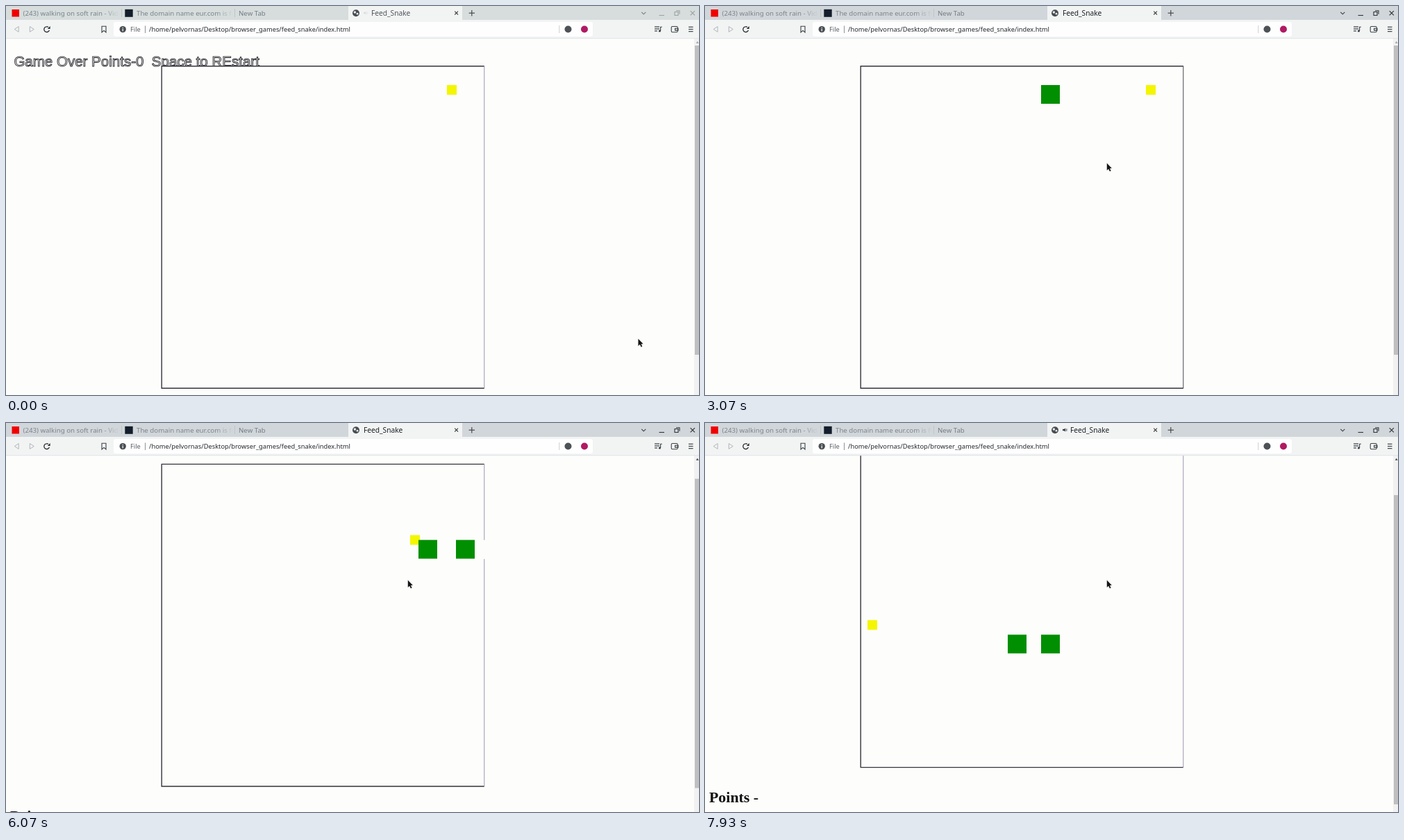
Recreate the animation shown at these times as an HTML page with a canvas. Size 998 by 561 pixels, loop 8 s.

```html
<!DOCTYPE html>
<html lang="en">
<head>
<meta charset="utf-8">
<title>Feed_Snake</title>
<style>
html, body { margin: 0; width: 100%; height: 100%; overflow: hidden; background: #fdfdfb; }
canvas { display: block; width: 998px; height: 561px; }
</style>
</head>
<body>
<canvas id="stage" width="998" height="561"></canvas>
<script>
const g = document.getElementById('stage').getContext('2d');
const LOOP = 8000, TICK = 100, UNIT = 0.684, PAPER = '#fdfdfb';
const BOARD = { x: 224.2, y: 86.7, size: 464.6 };
const UI = '"Noto Sans", "Open Sans", sans-serif';
const INK = '#3b4044';

const RESTART = 2830, MEALS = [4970, 6170];
const FOODS = [[600, 40], [523, 149], [15, 369]];
const SPEEDS = [0.1, 0.12, 0.35];   // board units per ms, by score
const DIRS = { right: [1, 0], left: [-1, 0], up: [0, -1], down: [0, 1] };
// The arrow keys steer the snake and scroll the page
const KEYS = [
  [2770, 'right'], [4870, 'down'], [5870, 'left'], [6400, 'up'],
  [6600, 'left'], [6780, 'down'], [7470, 'down'], [7667, 'left']
];

const clamp = (v, lo = 0, hi = 1) => Math.max(lo, Math.min(hi, v));
const ease = v => { v = clamp(v); return v * v * (3 - 2 * v); };
const mix = (a, b, p) => a + (b - a) * p;
const scoreAt = t => MEALS.filter(m => t >= m).length;

function rect(x, y, w, h, color) {
  g.fillStyle = color;
  g.fillRect(x, y, w, h);
}

function box(x, y, w, h, color, width = 1.1, r = 0) {
  g.strokeStyle = color;
  g.lineWidth = width;
  g.beginPath();
  g.roundRect(x, y, w, h, r);
  g.stroke();
}

function dot(x, y, r, color) {
  g.fillStyle = color;
  g.beginPath();
  g.arc(x, y, r, 0, Math.PI * 2);
  g.fill();
}

function trace(points, close) {
  g.beginPath();
  points.forEach(([x, y]) => g.lineTo(x, y));
  if (close) g.closePath();
}

function line(points, color, width = 1.1, close = false) {
  g.strokeStyle = color;
  g.lineWidth = width;
  trace(points, close);
  g.stroke();
}

function shape(points, color) {
  g.fillStyle = color;
  trace(points, true);
  g.fill();
}

// Corners of a triangle whose tip points along dx, dy
function triangle(x, y, dx, dy, r) {
  return [[x + dx * r, y + dy * r],
          [x - dx * r - dy * r * 1.3, y - dy * r - dx * r * 1.3],
          [x - dx * r + dy * r * 1.3, y - dy * r + dx * r * 1.3]];
}

function cross(x, y, r, turn, color) {
  for (const a of [turn, turn + Math.PI / 2]) {
    const dx = Math.cos(a) * r, dy = Math.sin(a) * r;
    line([[x - dx, y - dy], [x + dx, y + dy]], color, 1.15);
  }
}

function clipped(x, y, w, h, draw) {
  g.save();
  g.beginPath();
  g.rect(x, y, w, h);
  g.clip();
  draw();
  g.restore();
}

function label(text, x, y, size, color, weight = 400, family = UI) {
  g.font = `${weight} ${size}px ${family}`;
  g.fillStyle = color;
  g.fillText(text, x, y);
}

function fadedLabel(text, x, end) {
  const fade = g.createLinearGradient(end - 24, 0, end, 0);
  fade.addColorStop(0, '#7b838a');
  fade.addColorStop(1, 'rgba(123,131,138,0)');
  clipped(x, 0, end - x, 20, () => label(text, x, 13.5, 9.7, fade));
}

function scrollAt(t) {
  let pos = 0;
  for (const [time, key] of KEYS) {
    const goal = clamp(pos + DIRS[key][1] * 40, 0, 80);
    pos = mix(pos, goal, ease((t - time - TICK) / 150));
  }
  return pos * UNIT;
}

function snakeAt(t) {
  let x = 350, y = 40, dir = DIRS.right, k = 0;
  for (let time = KEYS[0][0]; time < t; time += 10) {
    while (k < KEYS.length && KEYS[k][0] <= time) dir = DIRS[KEYS[k++][1]];
    const step = SPEEDS[scoreAt(time)] * 10;
    x += dir[0] * step;
    y += dir[1] * step;
  }
  const snap = v => Math.round(v / 10) * 10;
  return { x: snap(x), y: snap(y), dir };
}

function block(x, y, size, color) {
  const side = Math.round(size * UNIT);
  rect(Math.round(BOARD.x + x * UNIT), Math.round(BOARD.y + y * UNIT), side, side, color);
}

function drawSnake(t) {
  const n = Math.floor((t - 70) / TICK), tick = n * TICK + 70;
  const flickers = n % 16 < 11;
  if (t < RESTART || (flickers && t - tick < 30)) return;
  const { x, y, dir: [dx, dy] } = snakeAt(tick);
  const score = scoreAt(t), gap = 90 - score * 10;
  const tail = { x: x - dx * gap, y: y - dy * gap };
  block(x, y, 40, '#008f00');
  if (!score) return;
  block(tail.x, tail.y, 40, '#008f00');
  // The tail wipes the board edge as it pulls away
  if (score === 1 && dx < 0) {
    rect(BOARD.x + BOARD.size - 1, BOARD.y + y * UNIT, 3, 40 * UNIT, PAPER);
  }
}

function drawBoard(t) {
  const { x, y, size } = BOARD, r = x + size, b = y + size;
  const crisp = t >= RESTART && t < MEALS[0];
  line([[r, y], [x, y], [x, b], [r, b]], '#35333d', 1.4);
  line([[r, y], [r, b]], crisp ? '#45434d' : '#9a96ae', 1);
  block(...FOODS[scoreAt(t)], 20, '#f4f600');
  clipped(x, y, size + 2, size, () => drawSnake(t));
}

function drawMessage() {
  const write = () => {
    g.font = '20.52px "Liberation Sans", Arial, sans-serif';
    g.strokeStyle = '#34343b';
    g.lineWidth = 1;
    g.strokeText('Game Over Points-0  Space to REstart', 11.4, 87);
  };
  clipped(0, 60, 224, 40, write);
  clipped(224, 60, 300, 26, write);
}

function drawPage(t) {
  const s = scrollAt(t);
  rect(0, 47, 998, 514, PAPER);
  clipped(0, 47, 991, 514, () => {
    g.translate(0, -s);
    if (t < RESTART) drawMessage();
    drawBoard(t);
    label('Points -', 6, 601.7, 21.9, '#111', 700, '"Liberation Serif", Times, serif');
  });
  rect(991, 47, 7, 514, '#f1f1f2');
  rect(992, 57 + s * 0.858, 6, 446, '#bfbfc1');
  shape(triangle(995.7, 52.2, 0, -1, 1.5), s > 1 ? '#444' : '#a0a0a0');
}

function drawSpeaker(color) {
  rect(515, 8.8, 2, 2.4, color);
  shape(triangle(517.2, 10, -1, 0, 2), color);
  rect(520.4, 8.2, 0.9, 3.6, color);
}

function drawTabs(t) {
  const focus = t >= 700, ink = focus ? '#2e3338' : '#9aa2a4';
  rect(0, 0, 998, 20, focus ? '#d1d6da' : '#d6dddc');
  rect(493, 0, 164, 20, '#f2f4f4');

  rect(8.5, 5, 10.5, 10.5, '#f00000');
  fadedLabel('(243) walking on soft rain - Video', 24.5, 163);
  rect(171.3, 4.8, 11.4, 11, '#131d2b');
  fadedLabel('The domain name eur.com is for', 188, 327);
  label('New Tab', 335, 13.5, 9.7, '#747d84');
  for (const x of [166, 329]) rect(x, 4, 1, 12, '#bec5ca');

  dot(504, 10.2, 5, '#484d52');
  dot(502.4, 9, 1.7, '#e8eaec');
  dot(506, 11.2, 1.4, '#e8eaec');

  const fading = t < 900, sound = fading || t >= MEALS[1] + TICK;
  if (sound) drawSpeaker(fading ? 'rgba(80,85,90,0.1)' : INK);
  label('Feed_Snake', sound ? 526 : 515, 13.6, 10.2, focus ? '#1c2024' : '#50565b', 500);
  cross(648.6, 10.1, 3.4, Math.PI / 4, '#444');
  cross(670.8, 10.2, 4.2, 0, '#444');

  line([[915.3, 8.8], [918.3, 11.8], [921.3, 8.8]], focus ? '#34393d' : '#737b7d');
  line([[940.5, 13.5], [948, 13.5]], ink);
  box(963, 8.5, 5, 5, ink);
  line([[965, 6.7], [970, 6.7], [970, 11.7]], ink);
  cross(988.8, 10.2, 4.4, Math.PI / 4, ink);
}

function drawToolbar() {
  rect(0, 20, 998, 27, '#f2f4f4');
  g.fillStyle = '#fefefe';
  g.beginPath();
  g.roundRect(155, 23, 690, 21, 3);
  g.fill();
  rect(0, 46.4, 998, 0.8, '#dadce6');

  line(triangle(15.2, 33.5, -1, 0, 3), '#b1b5b9', 1, true);
  line(triangle(37.3, 33.5, 1, 0, 3), '#b1b5b9', 1, true);

  g.strokeStyle = '#25292c';
  g.lineWidth = 1.3;
  g.beginPath();
  g.arc(58.7, 33.7, 3.9, 0.3, 5.3);
  g.stroke();
  shape([[63.6, 29], [63.6, 33], [59.8, 33]], '#25292c');

  line([[138, 29.3], [144, 29.3], [144, 38], [141, 35.4], [138, 38]], INK, 1.1, true);
  dot(168.2, 33.6, 4.7, '#4b5054');
  rect(167.6, 30.8, 1.2, 1.2, '#fff');
  rect(167.6, 32.8, 1.2, 3.6, '#fff');
  label('File', 179, 37, 9.3, '#5a6065');
  rect(200, 28.5, 1, 10.5, '#8d9296');
  label('/home/pelvornas/Desktop/browser_games/feed_snake/index.html', 206, 37, 9.3, '#25292d');

  rect(796.3, 28, 1, 11, '#c9cdd0');
  dot(809.5, 33.5, 5, '#4d5256');
  dot(833, 33.5, 5, '#b01a62');

  for (let i = 0; i < 3; i++) {
    rect(934, 29.4 + i * 3, i < 2 ? 7 : 4, 1.2, INK);
    rect(983, 29.7 + i * 3.2, 6.5, 1.2, INK);
  }
  line([[944.8, 30.3], [942.6, 30.3], [942.6, 36]], INK);
  dot(941.4, 36, 1.6, INK);
  box(958.2, 29.5, 9, 8.2, INK, 1.1, 1.5);
  box(963.6, 32.3, 4.4, 2.8, INK);
}

function drawPointer(t) {
  const p = ease((t - 30) / 770);
  const arrow = [[0, 0], [0, 10.2], [2.4, 8.1], [4.1, 11.8], [5.8, 11], [4.1, 7.5], [7, 7.2]];
  g.save();
  g.translate(mix(910.5, 578.8, p), mix(480, 226.8, p));
  line(arrow, '#f6f6f6', 1.4, true);
  shape(arrow, '#151515');
  g.restore();
}

const start = performance.now();
function play() {
  const t = Math.max(0, performance.now() - start) % LOOP;
  drawPage(t);
  drawTabs(t);
  drawToolbar();
  drawPointer(t);
  requestAnimationFrame(play);
}
play();
</script>
</body>
</html>
```
